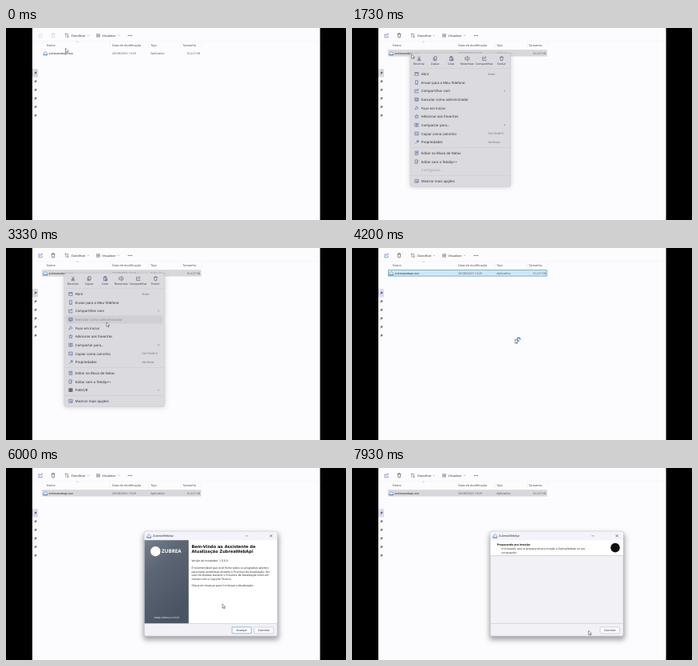
Recreate the animation shown at these times as an HTML page. Size 426 px wide and 240 px high, loop 8000 ms.

```html
<!DOCTYPE html>
<html lang="pt-BR">
<head>
<meta charset="utf-8">
<title>Assistente de atualização</title>
<style>
html, body { margin: 0; width: 100%; height: 100%; overflow: hidden; background: #000; }
svg { display: block; width: 100%; height: 100%; }
text { font-family: "Open Sans", "Noto Sans", sans-serif; text-rendering: geometricPrecision; white-space: pre; }
</style>
</head>
<body>
<svg id="stage" viewBox="0 0 426 240">
  <defs>
    <linearGradient id="panel" x1="0" y1="0" x2="0.5" y2="1">
      <stop offset="0" stop-color="#77808f"/>
      <stop offset="0.35" stop-color="#5d6674"/>
      <stop offset="1" stop-color="#4a5362"/>
    </linearGradient>
    <filter id="soft" x="-20%" y="-20%" width="140%" height="140%">
      <feGaussianBlur stdDeviation="3.2"/>
    </filter>
  </defs>
</svg>
<script>
const LOOP = 8000;
const APP = "ZubreaWebApi";
const NS = "http://www.w3.org/2000/svg";
const stage = document.getElementById("stage");

function add(parent, tag, attrs, content) {
  const el = document.createElementNS(NS, tag);
  for (const k in attrs) el.setAttribute(k, attrs[k]);
  if (content !== undefined) el.textContent = content;
  parent.appendChild(el);
  return el;
}
const group = (parent, attrs = {}) => add(parent, "g", attrs);
const rect = (p, x, y, width, height, fill, more) => add(p, "rect", { x, y, width, height, fill, ...more });
const text = (p, x, y, size, s, fill = "#222", more) => add(p, "text", { x, y, "font-size": size, fill, ...more }, s);
const line = (p, d, stroke = "#555", w = 0.5, fill = "none") =>
  add(p, "path", { d, stroke, "stroke-width": w, fill, "stroke-linejoin": "round" });
const show = (el, on) => el.setAttribute("visibility", on ? "inherit" : "hidden");
const MID = { "text-anchor": "middle" };

// File list
rect(stage, 0, 0, 426, 240, "#000");
rect(stage, 33, 0, 360.5, 240, "#fcfcfe");
line(stage, "M33 16.6H393.5", "#f0f0ee", 0.5);

const tools = group(stage);
line(tools, "M42.5 7.7H41V11.7H45.2V10M42.5 10Q42.8 7.8 45.4 7.8M44.2 6.5L45.5 7.8 44.2 9.1", "#4a63b4", 0.6);
line(tools, "M56.8 7.6H61.4M57.5 7.6L57.9 11.9H60.3L60.7 7.6M58.4 7.4V6.6H59.8V7.4", "#444", 0.6);
line(stage, "M75 11.8V6.8M73.8 8L75 6.8 76.2 8M77.5 6.8V11.8M76.3 10.6L77.5 11.8 78.7 10.6", "#555", 0.55);
text(stage, 81.8, 10.8, 3.75, "Classificar");
line(stage, "M102 8.9L103 9.9 104 8.9", "#777", 0.45);
line(stage, "M113 7.8H118M113 9.4H118M113 11H118", "#444", 0.6);
text(stage, 120.6, 10.8, 3.75, "Visualizar");
line(stage, "M140 8.9L141 9.9 142 8.9", "#777", 0.45);
for (const x of [153.3, 155.4, 157.5]) add(stage, "circle", { cx: x, cy: 9.3, r: 0.6, fill: "#333" });

line(stage, "M88.4 17.9L89.6 16.9 90.8 17.9", "#888", 0.45);
for (const [x, s] of [[50.8, "Nome"], [133, "Data de modificação"], [181.2, "Tipo"], [221.5, "Tamanho"]])
  text(stage, x, 22.7, 3.8, s, "#454550");
line(stage, "M130.5 18V25M179.3 18V25M219.5 18V25M245 18V25", "#e8e8ea", 0.4);

const sideMark = rect(stage, 33, 51, 7, 10.6, "#d9d9dd", { rx: 1 });
for (let i = 0; i < 6; i++) {
  const g = group(stage, { transform: `translate(36.8 ${56.3 + i * 10.65}) rotate(40)` });
  line(g, "M-.8 -1.6H.8M-.6 -1.5V.1H.6V-1.5M-1.3 .2H1.3M0 .2V2", "#50535f", 0.5, "#50535f");
}

const row = rect(stage, 45.3, 27.7, 198.8, 7.4, "#cde7f8", { "stroke-width": 0.6 });
line(stage, "M47 31.6L49.3 29.3 51.6 31.6V33.5H47Z", "#4d7cb0", 0.6, "#e4eef9");
line(stage, "M46.6 33.7H52", "#3f6fa8", 0.7);
text(stage, 53.6, 32.8, 3.6, APP.toLowerCase() + ".exe", "#1d1d22");
text(stage, 133, 32.8, 3.7, "20/08/2025 10:29", "#55555c");
text(stage, 181.2, 32.8, 3.85, "Aplicativo", "#55555c");
text(stage, 243, 32.8, 3.6, "16.227 KB", "#55555c", { "text-anchor": "end" });

// Context menu
const menu = group(stage);
rect(menu, 73, 33, 126, 166, "#666", { rx: 3, opacity: 0.28, filter: "url(#soft)" });
rect(menu, 72.8, 31.6, 125.8, 166.8, "#dadadf", { rx: 2.2, stroke: "#c3c3ca", "stroke-width": 0.4 });
const hover = rect(menu, 75, 0, 121.4, 10.2, "#cfcfd6", { rx: 1.2 });

const actions = [
  [84, "Recortar", "M-1.5 -2.5L1 1M1.5 -2.5L-1 1M-2 1.8A.9 .9 0 1 0 -.2 1.8A.9 .9 0 1 0 -2 1.8M.2 1.8A.9 .9 0 1 0 2 1.8A.9 .9 0 1 0 .2 1.8"],
  [104.2, "Copiar", "M-1 -2.4H1.9V1.3H-1ZM-1 -1.2H-2V2.5H1V1.3"],
  [124.4, "Colar", "M-2 -2H1.6V2.4H-2ZM-.9 -2.6H.6V-1.5H-.9ZM0 0H2.3V2.6H0Z"],
  [144.3, "Renomear", "M-.6 -1.4H-2.5V1.4H-.6M1.4 -1.4H2.5V1.4H1.4M.4 -2.5V2.5M-.4 -2.5H1.2M-.4 2.5H1.2"],
  [165.8, "Compartilhar", "M-.6 -1.6H-2.2V2.4H2V.9M-1 .7Q-.6 -1.5 2 -1.5M.9 -2.7L2.2 -1.5 .9 -.3"],
  [187.4, "Excluir", "M-2.4 -1.6H2.4M-1.7 -1.6L-1.3 2.5H1.3L1.7 -1.6M-.7 -1.7V-2.5H.7V-1.7"]
];
for (const [x, s, d] of actions) {
  line(group(menu, { transform: `translate(${x} 38.2)` }), d, "#3f4d72", 0.55);
  text(menu, x, 46.4, 3.55, s, "#33333b", MID);
}
for (const y of [50.4, 149.4, 184.4]) line(menu, `M73 ${y}H198.4`, "#c4c4cb", 0.45);

const box = "M-2.2 -1.9H2.2V1.9H-2.2Z";
const zip = box + "M0 -1.9V1.9M-.7 -.7H.7M-.7 .6H.7";
const items = [
  [57.4, "Abrir", box + "M-2.2 -.9H2.2", "Enter"],
  [68, "Enviar para o Meu Telefone", "M-1.4 -2.4H1.4V2.4H-1.4ZM-.4 1.6H.4"],
  [78.6, "Compartilhar com", "M-.6 -1.5H-2.2V2.3H2V.9M-1 .7Q-.6 -1.5 2 -1.5M.9 -2.6L2.2 -1.5 .9 -.4", ">"],
  [89.3, "Executar como administrador", box + "M0 -.8L1.5 -.2Q1.4 1.2 0 1.6Q-1.4 1.2 -1.5 -.2Z"],
  [100, "Fixar em Iniciar", "M-.4 -2.2L2.2 .4 .8 .6 -.6 2 -2 .6 -.6 -.8ZM-1.3 1.3L-2.4 2.4"],
  [110.6, "Adicionar aos Favoritos", "M0 -2.4L.7 -.8 2.4 -.7 1.1 .5 1.5 2.2 0 1.3 -1.5 2.2 -1.1 .5 -2.4 -.7 -.7 -.8Z"],
  [121.2, "Compactar para...", zip, ">"],
  [132, "Copiar como caminho", box + "M-1.3 .8L0 -.8M.2 .8H1.4", "Ctrl+Shift+C"],
  [142.6, "Propriedades", "M-1.7 2L.5 -.2M.2 -.5A1.5 1.5 0 0 1 2 -2L1.2 -1 2 -.4 2.3 -1.3A1.5 1.5 0 0 1 .6 .4", "Alt+Enter"],
  [156.2, "Editar no Bloco de Notas", "M-1.8 -2.2H1.8V2.3H-1.8ZM-1 -.8H1M-1 .3H1"],
  [167, "Editar com o Tekslip++", "M-1.9 -2.2H1.1V2.3H-1.9ZM-.3 1L2.2 -1.5"],
  [177.6, "PakVUR", zip, ">"],
  [191.3, "Mostrar mais opções", box + "M-1 -1L1 1M1 -.4V1H-.4"]
];
const entries = items.map(([y, s, d, tail]) => {
  const g = group(menu);
  const icon = group(g, { transform: `translate(81 ${y})` });
  const dark = s === "PakVUR";
  line(icon, d, dark ? "#4a3844" : "#41598c", 0.55, dark ? "#a08a68" : "none");
  const label = text(g, 86.8, y + 1.5, 4.3, s, "#24242a");
  if (tail === ">") line(g, `M190.6 ${y - 1.1}L191.7 ${y} 190.6 ${y + 1.1}`, "#555", 0.5);
  else if (tail) text(g, 170.6, y + 1.4, 3.6, tail, "#63636c");
  return { g, label, y };
});
const loading = text(menu, 86.8, 179.1, 4.3, "Carregando...", "#9b9ba2");

// Installer
const wizard = group(stage);
rect(wizard, 172, 82, 170, 133, "#5d5d68", { rx: 4, opacity: 0.55, filter: "url(#soft)" });
rect(wizard, 173.2, 79.2, 166.8, 131, "#f1f1f6", { rx: 2, stroke: "#a9a9b2", "stroke-width": 0.5 });
rect(wizard, 173.5, 79.5, 166.2, 10.8, "#f3f3fb", { rx: 1.8 });
line(wizard, "M176.8 85L179.2 82.6 181.6 85V87H176.8Z", "#4d7cb0", 0.6, "#e4eef9");
line(wizard, "M176.4 87.2H182", "#3f6fa8", 0.7);
text(wizard, 184, 86.4, 3.75, APP);
line(wizard, "M300 84.9H303.4", "#555", 0.5);
line(wizard, "M330.4 83.2L333.6 86.4M333.6 83.2L330.4 86.4", "#333", 0.55);

const welcome = group(wizard);
rect(welcome, 228.8, 90.2, 110.9, 104, "#fff");
rect(welcome, 173.6, 90.2, 55.2, 104, "url(#panel)");
add(welcome, "circle", { cx: 187.3, cy: 104.2, r: 6.2, fill: "#fff" });
text(welcome, 195, 105.6, 6.3, "ZUBREA", "#fff", { "font-weight": 700 });
text(welcome, 201.4, 188.3, 3.4, "www.zubrea.com.br", "#fff", MID);
const head = { "font-weight": 700, style: 'font-family:"DejaVu Sans",sans-serif' };
text(welcome, 232.4, 99.8, 5.1, "Bem-Vindo ao Assistente de", "#111", head);
text(welcome, 232.4, 106, 5.1, "Atualização " + APP, "#111", head);
const body = [
  [117.3, "Versão do Instalador: 1.0.0.0"],
  [126.2, "É recomendável que você feche todos os programas abertos"],
  [130.8, "para evitar problemas durante o Processo de Atualização. Em"],
  [135.4, "caso de dúvidas durante o Processo de Atualização entre em"],
  [140, "contato com o Suporte Técnico."],
  [147.9, "Clique em Avançar para Continuar a Atualização..."]
];
for (const [y, s] of body) text(welcome, 232.4, y, 3.45, s, "#1c1c20");

const prepare = group(wizard);
rect(prepare, 173.6, 90.2, 166.1, 19.2, "#fff");
line(prepare, "M173.5 109.6H339.8", "#b0b0b8", 0.5);
text(prepare, 181.8, 96.7, 3.5, "Preparando pra Instalar", "#111", { "font-weight": 700 });
text(prepare, 187, 102.3, 3.3, `O instalador está se preparando pra instalar a ${APP} no seu`, "#1c1c20");
text(prepare, 187, 106.8, 3.3, "computador.", "#1c1c20");
add(prepare, "circle", { cx: 329.8, cy: 99.6, r: 5.8, fill: "#111" });

line(wizard, "M173.5 194.4H339.8", "#b4b4bc", 0.5);
function button(p, x, s) {
  const r = rect(p, x, 198.8, 24.2, 8, "#fafafc", { stroke: "#b2b2ba", "stroke-width": 0.5, rx: 0.5 });
  text(p, x + 12.1, 204.1, 3.6, s, "#1c1c20", MID);
  return r;
}
const next = button(welcome, 283.2, "Avançar");
button(wizard, 311, "Cancelar");

// Pointer
const pointer = group(stage);
line(pointer, "M0 0V5.4L1.3 4.3 2.1 6.2 3 5.8 2.2 4H3.9Z", "#222", 0.45, "#fff");
const busy = add(pointer, "circle", {
  cx: 4.6, cy: 0.4, r: 1.9, fill: "#d6ecfb", stroke: "#2478bd", "stroke-width": 1.1, "stroke-dasharray": "9 3"
});

// time, x, y
const path = [
  [0, 74.5, 25.2], [350, 73.5, 28], [750, 72.6, 30.8], [1650, 72.6, 30.8], [2330, 126.6, 75.2],
  [2530, 126.6, 75.2], [3000, 126, 92.8], [3600, 126, 92.8], [4500, 231.5, 121],
  [5550, 231.5, 121], [6350, 298, 203], [7000, 298, 203], [7350, 296.4, 203.2], [LOOP, 296.4, 203.2]
];
function pointAt(t) {
  const i = Math.max(1, path.findIndex(p => p[0] > t));
  const [t0, x0, y0] = path[i - 1], [t1, x1, y1] = path[i];
  const k = (t - t0) / (t1 - t0), e = k * k * (3 - 2 * k);
  return [x0 + (x1 - x0) * e, y0 + (y1 - y0) * e];
}

const T = { select: 870, menu: 1530, loaded: 2800, press: 3200, close: 3470, open: 5530, page: 7070 };

function draw(t) {
  const [x, y] = pointAt(t);
  const menuOn = t >= T.menu && t < T.close;
  const wizardOn = t >= T.open;
  const selected = t >= T.select;
  const active = selected && !menuOn && !wizardOn;

  tools.setAttribute("opacity", t >= 1130 ? 1 : 0.28);
  show(row, selected);
  row.setAttribute("fill", active ? "#cde7f8" : "#d8d8dc");
  row.setAttribute("stroke", active ? "#4d8796" : "#d0d0d5");
  sideMark.setAttribute("fill", t >= T.close ? "#dcdcf0" : "#d9d9dd");

  show(menu, menuOn);
  show(loading, menuOn && t < T.loaded);
  show(entries[11].g, menuOn && t >= T.loaded);
  const over = entries.find(e => Math.abs(e.y - y) < 5.33);
  show(hover, menuOn && !!over && x > 75);
  if (over) hover.setAttribute("y", over.y - 5.1);
  entries[3].label.setAttribute("fill", t >= T.press ? "#85858d" : "#24242a");

  show(wizard, wizardOn);
  show(welcome, wizardOn && t < T.page);
  show(prepare, t >= T.page);
  const hot = x > 283 && y > 198;
  next.setAttribute("fill", hot ? "#e0eefa" : "#fafafc");
  next.setAttribute("stroke", "#3b83bd");

  pointer.setAttribute("transform", `translate(${x.toFixed(2)} ${y.toFixed(2)})`);
  show(busy, t >= T.close && t < T.open);
  busy.setAttribute("transform", `rotate(${(t * 0.36) % 360} 4.6 .4)`);
}

const start = performance.now();
function tick() {
  draw((performance.now() - start) % LOOP);
  requestAnimationFrame(tick);
}
tick();
</script>
</body>
</html>
```
